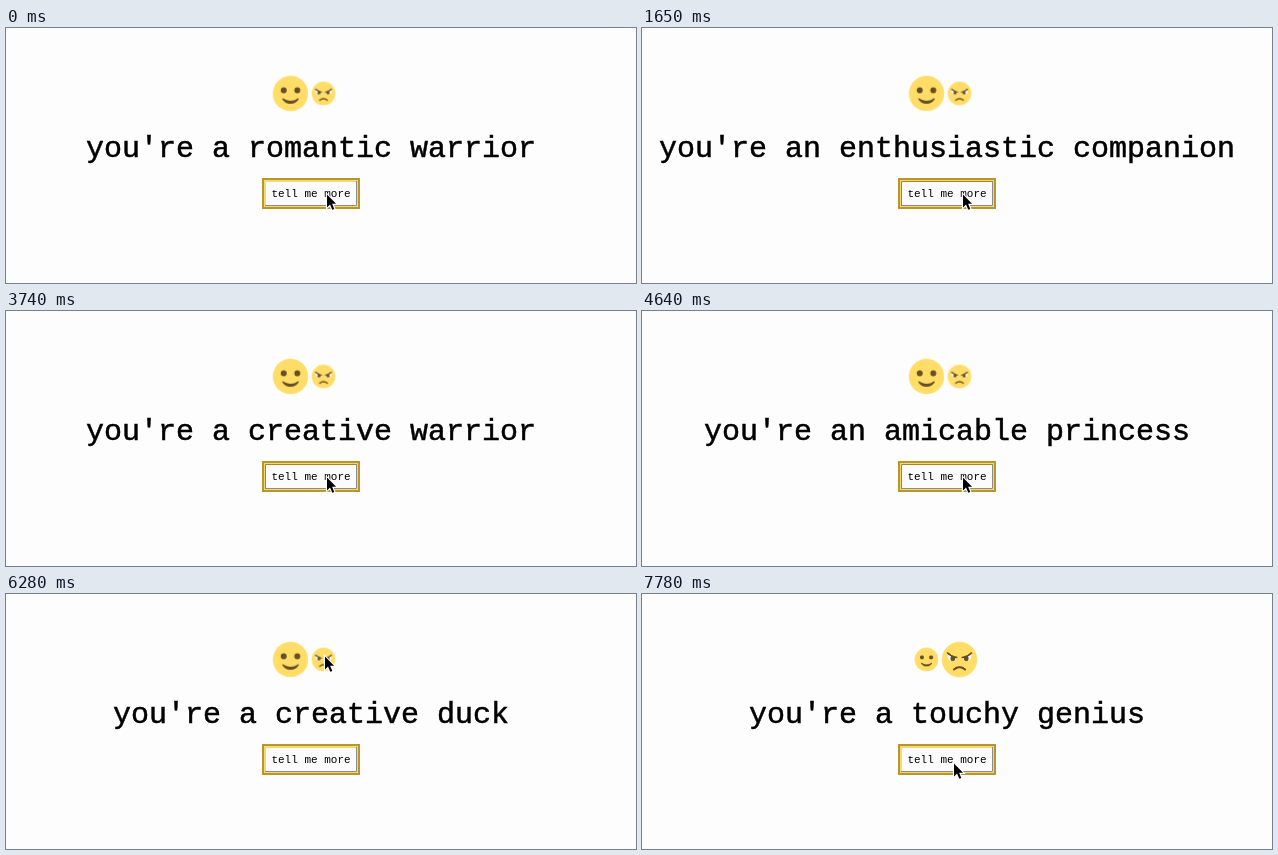
Animation of 630x255 px, one loop 8000 ms. Source, as an HTML page:

```html
<!DOCTYPE html>
<html lang="en">
<head>
<meta charset="utf-8">
<title>Tell me more</title>
<style>
  html, body { margin: 0; width: 100%; height: 100%; overflow: hidden; background: #fdfdfd; }
  svg { display: block; width: 630px; height: 255px; overflow: hidden; }
  text { font-family: "Courier New", "Liberation Mono", monospace; text-anchor: middle; fill: #000; }
  .lines { font-size: 30px; stroke: #000; stroke-width: .5px; }
  .label { font-size: 11px; }

  .lines, .pressed, .smile, .angry, .cursor { animation: 8s step-end infinite; }
  .lines { animation-name: lines; }
  .pressed { animation-name: press; }
  .smile { animation-name: smile; }
  .angry { animation-name: angry; }
  .cursor { animation-name: point; }

  /* The lines are stacked 300px apart, one stage view each. */
  @keyframes lines {
    0% { transform: translateY(0); }
    9.375% { transform: translateY(-300px); }
    22.5% { transform: translateY(-600px); }
    35.625% { transform: translateY(-900px); }
    48.625% { transform: translateY(-1200px); }
    59.875% { transform: translateY(-1500px); }
    71.125% { transform: translateY(-1800px); }
    97.25%, 100% { transform: translateY(-2100px); }
  }
  @keyframes press {
    0%, 9.375%, 22.5%, 35.625%, 48.625%, 59.875%, 71.125%, 97.25%, 100% { opacity: 0; }
    7.5%, 20.625%, 33.75%, 46.75%, 58%, 69.25%, 95.375% { opacity: 1; }
  }
  @keyframes smile {
    0% { transform: translate(284.5px, 65.5px) scale(.59); }
    84.125%, 100% { transform: translate(284.5px, 65.5px) scale(.395); }
  }
  @keyframes angry {
    0% { transform: translate(317.5px, 65.5px) scale(.395); }
    84.125%, 100% { transform: translate(317.5px, 65.5px) scale(.59); }
  }
  @keyframes point {
    0% { transform: translate(320px, 165px); }
    74.75% { transform: translate(319px, 145px); }
    76.625% { transform: translate(320px, 85px); }
    78.5% { transform: translate(318px, 61px); }
    84.125% { transform: translate(320px, 61px); }
    87.875% { transform: translate(317px, 120px); }
    89.75% { transform: translate(319px, 144px); }
    91.625% { transform: translate(312px, 168px); }
    93.5%, 100% { transform: translate(311px, 168px); }
  }
</style>
</head>
<body>
<svg viewBox="0 0 630 255">
  <g class="smile">
    <circle r="30" fill="#ffdd67"/>
    <g fill="#664e27">
      <circle cx="-11.5" cy="-5.5" r="5"/>
      <circle cx="11.5" cy="-5.5" r="5"/>
      <path d="M12.6 8.3C4.5 14-4.5 13.9-12.6 8.3c-1-.7-1.8.5-1.2 1.6C-11.3 13.9-6.4 17.6 0 17.6S11.3 14 13.8 9.9c.6-1.1-.2-2.3-1.2-1.6"/>
    </g>
  </g>

  <g class="angry">
    <circle r="30" fill="#ffdd67"/>
    <g id="eye">
      <path d="M-19.5-9L-5-2A7.6 7.6 0 1 1-19.5-9" fill="#fff"/>
      <circle cx="-11.5" cy="-1.5" r="4" fill="#664e27"/>
      <path d="M-20-11Q-14-5-5-3.5" fill="none" stroke="#664e27" stroke-width="3" stroke-linecap="round"/>
    </g>
    <use href="#eye" transform="scale(-1 1)"/>
    <path d="M-9.5 17Q0 9 9.5 17" fill="none" stroke="#664e27" stroke-width="3.4" stroke-linecap="round"/>
  </g>

  <g class="lines">
    <text x="305" y="129">you're a romantic warrior</text>
    <text x="305" y="429">you're an enthusiastic companion</text>
    <text x="305" y="729">you're an optimistic duck</text>
    <text x="305" y="1029">you're a creative warrior</text>
    <text x="305" y="1329">you're an amicable princess</text>
    <text x="305" y="1629">you're a kind warrior</text>
    <text x="305" y="1929">you're a creative duck</text>
    <text x="305" y="2229">you're a touchy genius</text>
  </g>

  <g fill="none">
    <rect x="257" y="151" width="96" height="29" fill="#fbfbfc" stroke="#b8952d" stroke-width="2"/>
    <rect x="258.5" y="152.5" width="93" height="26" stroke="#f1da70"/>
    <path d="M259.5 178V153.5H351" stroke="#f1da70"/>
    <path d="M350.5 153V177.5H259" stroke="#8f8a8c"/>
    <path class="pressed" d="M259.5 178V153.5H351" stroke="#a98522"/>
  </g>
  <text class="label" x="305" y="169">tell me more</text>

  <g class="cursor">
    <path d="M1 1.6V14.4L4 11.6 6.3 16.8 8.3 15.9 6.1 10.8H10.1Z" stroke="#fff" stroke-width="2.2" paint-order="stroke"/>
  </g>
</svg>
</body>
</html>
```
